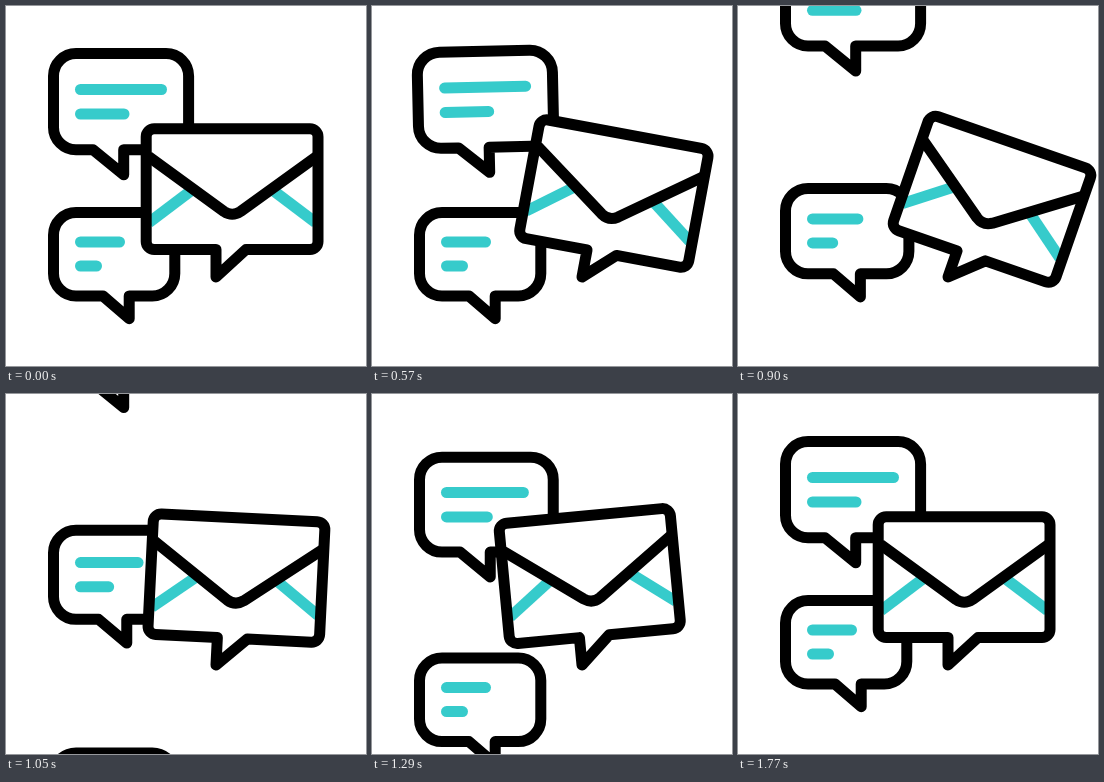
An HTML page with a canvas for the animation above (1.8 s loop, 360 px wide and 360 px high).

```html
<!DOCTYPE html>
<html lang="en">
<head>
<meta charset="utf-8">
<title>Messages</title>
<style>
html, body { margin: 0; width: 100%; height: 100%; overflow: hidden; background: #fff; }
canvas { display: block; width: 360px; height: 360px; }
</style>
</head>
<body>
<canvas id="stage"></canvas>
<script>
const SIZE = 360, LOOP = 1800;
const INK = '#000', TEAL = '#36cbcb', WEIGHT = 11;
const canvas = document.getElementById('stage');
const ctx = canvas.getContext('2d');
const scale = Math.max(1, window.devicePixelRatio || 1);
canvas.width = canvas.height = SIZE * scale;

const mix = (a, b, k) => a + (b - a) * k;

// Eased progress between two times
function ease(t, from, to) {
  const u = Math.min(1, Math.max(0, (t - from) / (to - from)));
  return u * u * (3 - 2 * u);
}

// Eased value through [time, value] keys
function track(t, keys) {
  let v = keys[0][1];
  for (let i = 1; i < keys.length; i++) {
    v += (keys[i][1] - keys[i - 1][1]) * ease(t, keys[i - 1][0], keys[i][0]);
  }
  return v;
}

const swing = [[170, 0], [924, 19.2], [1182, -14.3], [1445, 9.6], [1662, 0]];
const tilt = [[0, 0], [405, -13.3], [610, 0]];

function stroke(color, cap, points) {
  ctx.strokeStyle = color;
  ctx.lineCap = cap;
  ctx.beginPath();
  points.forEach(([x, y]) => ctx.lineTo(x, y));
  ctx.stroke();
}

// Rounded box with a speech tail on its bottom edge
function boxPath(l, t, r, b, rad, tail) {
  const path = new Path2D();
  path.moveTo(l + rad, t);
  path.arcTo(r, t, r, b, rad);
  path.arcTo(r, b, l, b, rad);
  tail.forEach(([x, y]) => path.lineTo(x, y));
  path.arcTo(l, b, l, t, rad);
  path.arcTo(l, t, r, t, rad);
  path.closePath();
  return path;
}

function fillBox(path) {
  ctx.fillStyle = '#fff';
  ctx.fill(path);
}

function outline(path) {
  ctx.strokeStyle = INK;
  ctx.stroke(path);
}

function turned(x, y, deg, draw) {
  ctx.save();
  ctx.translate(x, y);
  ctx.rotate(deg * Math.PI / 180);
  ctx.translate(-x, -y);
  draw();
  ctx.restore();
}

// k = 0: small lower bubble, k = 1: large upper bubble
function bubble(k, dy = 0, deg = 0) {
  const m = (a, b) => mix(a, b, k);
  const bottom = m(290, 143.7), tipX = m(123.2, 117.7), tipY = m(312.7, 168.8);
  ctx.save();
  ctx.translate(0, dy);
  turned(tipX, tipY, deg, () => {
    const body = boxPath(47.5, m(206.5, 47.5), m(168.8, 182.6), bottom, 22.5,
      [[tipX, bottom], [tipX, tipY], [m(97, 87), bottom]]);
    fillBox(body);
    outline(body);
    const y1 = m(236, 83.5), y2 = m(260, 108);
    stroke(TEAL, 'round', [[74.5, y1], [m(113.5, 155.5), y1]]);
    stroke(TEAL, 'round', [[74.5, y2], [m(90.5, 118), y2]]);
  });
  ctx.restore();
}

function envelope(deg) {
  turned(210, 271, deg, () => {
    const body = boxPath(140.2, 122.8, 312, 243.5, 8,
      [[240, 243.5], [210, 271], [210, 243.5]]);
    fillBox(body);
    stroke(TEAL, 'butt', [[143, 216.5], [186, 184]]);
    stroke(TEAL, 'butt', [[309.5, 216.5], [266.5, 184]]);
    outline(body);

    ctx.lineCap = 'butt';
    ctx.beginPath();
    ctx.moveTo(142.5, 150.5);
    ctx.lineTo(218, 205.5);
    ctx.quadraticCurveTo(226.2, 211, 234.5, 205.5);
    ctx.lineTo(310, 151);
    ctx.stroke();
  });
}

function draw(t) {
  ctx.setTransform(scale, 0, 0, scale, 0, 0);
  ctx.fillStyle = '#fff';
  ctx.fillRect(0, 0, SIZE, SIZE);
  ctx.lineWidth = WEIGHT;
  ctx.lineJoin = 'round';

  if (t > 900) bubble(0, 170 * (1 - ease(t, 934, 1520)));
  bubble(ease(t, 730, 1426));
  if (t < 1210) bubble(1, -178 * ease(t, 524, 1203), track(t, tilt));
  envelope(track(t, swing));
}

const start = performance.now();
function tick() {
  draw((performance.now() - start) % LOOP);
  requestAnimationFrame(tick);
}
tick();
</script>
</body>
</html>
```
